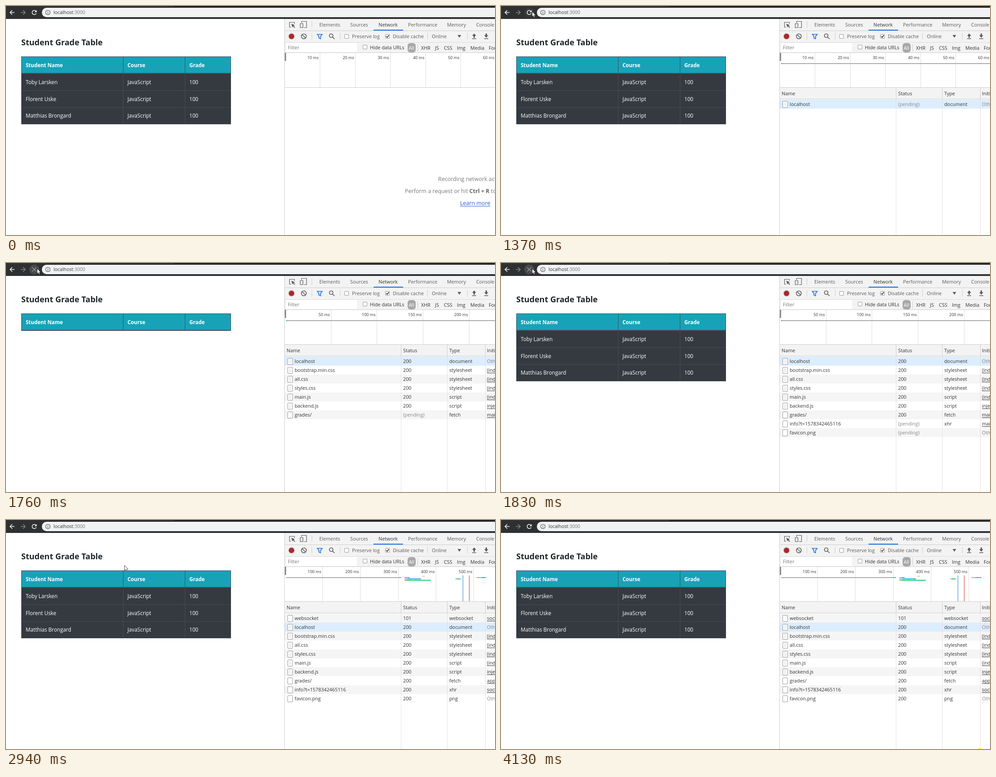
Write an HTML page with a canvas that moves like this. It is 1091 px wide and 513 px high and loops after 4200 ms.

```html
<!DOCTYPE html>
<html lang="en">
<head>
<meta charset="utf-8">
<title>Student Grade Table</title>
<style>
  html, body { margin: 0; width: 100%; height: 100%; overflow: hidden; background: #fff; }
  canvas { display: block; }
</style>
</head>
<body>
<canvas id="stage" width="1091" height="513"></canvas>
<script>
const ctx = document.getElementById('stage').getContext('2d');
const LOOP = 4200, W = 1091, H = 513, PANEL = 622;

function rect(x, y, w, h, color) {
  ctx.fillStyle = color;
  ctx.fillRect(x, y, w, h);
}
function pill(x, y, w, h, r, color) {
  ctx.fillStyle = color;
  ctx.beginPath();
  ctx.roundRect(x, y, w, h, r);
  ctx.fill();
}
function disc(x, y, r, color) {
  ctx.fillStyle = color;
  ctx.beginPath();
  ctx.arc(x, y, r, 0, 7);
  ctx.fill();
}
function stroke(d, color, width = 1) {
  ctx.strokeStyle = color;
  ctx.lineWidth = width;
  ctx.stroke(new Path2D(d));
}
function fill(d, color) {
  ctx.fillStyle = color;
  ctx.fill(new Path2D(d));
}
// Draws text on its baseline and returns the x where it ends.
function text(str, x, y, { size = 10.8, color = '#333', weight = 400, align = 'left', underline } = {}) {
  ctx.font = `${weight} ${size}px "Open Sans", "Noto Sans", sans-serif`;
  ctx.textAlign = align;
  ctx.fillStyle = color;
  ctx.fillText(str, x, y);
  const width = ctx.measureText(str).width;
  if (underline) ctx.fillRect(x, y + 2, width, 1);
  return x + width;
}

const lerp = (a, b, k) => a + (b - a) * k;
const easeOut = p => 1 - (1 - p) ** 2;
const steps = (t, start, length) => Math.floor((t - start) / length);

function cursorAt(t) {
  if (t < 120 || t >= 3170) return null;
  if (t < 680) {
    const k = easeOut(Math.min(1, steps(t, 120, 78) / 6));
    return [lerp(960, 129, k), lerp(496, 67, k)];
  }
  if (t < 2940) {
    const k = easeOut(Math.min(1, (steps(t, 680, 76.6) + 1) / 4));
    return [lerp(129, 69, k), lerp(67, 12, k)];
  }
  const k = ((steps(t, 2940, 76.6) + 1) / 3) ** 1.5;
  return [lerp(69, 1083, k), lerp(12, 476, k)];
}

function drawBrowserBar(t) {
  rect(0, 0, W, 29, '#2f3032');
  rect(375, 0, W - 375, 1, '#0c0c0d');
  stroke('M19 14.5H9M14 9.5L9 14.5L14 19.5', '#f2f2f2', 1.6);
  stroke('M33 14.5H43M38 9.5L43 14.5L38 19.5', '#858585', 1.6);

  if (t >= 910 && t < 2940) {
    const bright = t >= 1590 && t < 2140;
    disc(63, 14.5, 11, `rgba(255,255,255,${bright ? .13 : .04})`);
  }
  if (t >= 1760 && t < 2940) {
    stroke('M58.5 10L67.5 19M67.5 10L58.5 19', '#9a9a9a', 1.3);
  } else {
    stroke('M67.4 16.2A4.7 4.7 0 1 1 66.4 11.2', '#f2f2f2', 1.6);
    fill('M68.5 9V14H63.5Z', '#f2f2f2');
  }
  pill(80, 4, W, 21, 10.5, '#f1f2f3');
  stroke('M98.5 14.5A5 5 0 1 1 88.5 14.5A5 5 0 1 1 98.5 14.5M93.5 13.5V17.5M93.5 11.3V12.5', '#55585c', 1.2);
  const end = text('localhost', 106, 18, { size: 10.5, color: '#333' });
  text(':3000', end, 18, { size: 10.5, color: '#777' });
}

const students = ['Toby Larsken', 'Florent Uske', 'Matthias Brongard'];

function drawPage(loaded) {
  text('Student Grade Table', 34, 88, { size: 18, weight: 700, color: '#212529' });
  const border = '#454d55', columns = [44, 271, 409];
  const bottom = loaded ? 265 : 152;
  rect(34, 113, 468, bottom - 113, '#343a40');
  rect(34, 113, 468, 38, '#17a2b8');
  ['Student Name', 'Course', 'Grade'].forEach((label, i) =>
    text(label, columns[i], 136.5, { size: 11.5, weight: 700, color: '#fff' }));
  if (loaded) students.forEach((name, row) => {
    const y = 175 + row * 37.7;
    [name, 'JavaScript', '100'].forEach((cell, i) =>
      text(cell, columns[i], y, { size: 11.7, color: '#fff' }));
    if (row) rect(34, 151 + row * 38, 468, 1, border);
  });
  rect(34, 150, 468, 2, border);
  for (const x of [34, 261, 399, 501]) rect(x, 113, 1, bottom - 113, border);
  rect(34, 113, 468, 1, border);
  rect(34, bottom - 1, 468, 1, border);
}

function checkbox(x, y, checked) {
  pill(x, y, 10, 10, 2, '#999');
  pill(x + 1, y + 1, 8, 8, 1, '#fff');
  if (checked) stroke(`M${x + 2} ${y + 5}l2.3 2.3l4 -5`, '#333', 1.7);
}

function drawToolbars() {
  const dark = '#5a5a5a', divider = (x, y) => rect(x, y, 1, 15, '#ccc');
  rect(PANEL, 29, W, 76, '#f3f3f3');
  rect(PANEL, 55, W, 1, '#ccc');
  rect(PANEL, 81, W, 1, '#ddd');

  stroke('M643.5 40V36.5H632.5V47.5H636', dark, 1.2);
  fill('M636.5 39.5L644.5 43.2L641.6 44.3L645 47.7L643.6 49L640.3 45.6L639 48Z', dark);
  stroke('M659.5 38V34.5H670.5V48.5H665M656.5 39.5H662.5V48.5H656.5Z', dark, 1.2);
  divider(682, 34);
  [['Elements', 699], ['Sources', 768], ['Network', 831], ['Performance', 897], ['Memory', 984], ['Console', 1049]]
    .forEach(([label, x]) => text(label, x, 46, { color: label === 'Network' ? '#333' : '#5a5a5a' }));
  rect(820, 53, 66, 2, '#1a73e8');

  disc(637, 68, 7.5, '#e6c5c5');
  disc(637, 68, 6, '#a52a2f');
  stroke('M670 68A5.5 5.5 0 1 1 659 68A5.5 5.5 0 1 1 670 68M660.6 64.2L668.4 71.8', dark, 1.6);
  divider(682, 60);
  stroke('M694.5 63.5H705.5L701.8 68V73.5L698.2 72V68Z', '#1a73e8', 1.7);
  stroke('M729.5 66.5A4 4 0 1 1 721.5 66.5A4 4 0 1 1 729.5 66.5M728.5 69.5L733 74', dark, 1.7);
  divider(745, 60);
  checkbox(755, 63);
  text('Preserve log', 772, 72, { color: dark });
  checkbox(846, 63, true);
  text('Disable cache', 863, 72, { color: dark });
  divider(940, 60);
  text('Online', 950, 72, { color: dark });
  fill('M1007.5 65H1015.5L1011.5 71Z', dark);
  divider(1029, 60);
  fill('M1044.5 61.5L1049 67H1046V71H1043V67H1040ZM1040 72.5H1049V74H1040Z', dark);
  fill('M1071.5 71L1067 65.5H1070V61.5H1073V65.5H1076ZM1067 72.5H1076V74H1067Z', dark);

  rect(625, 83, 158, 20, '#fff');
  text('Filter', 629, 97, { color: '#777' });
  checkbox(796, 87);
  text('Hide data URLs', 812, 97);
  pill(896, 83, 18, 21, 6, '#a8a8a8');
  text('All', 898.5, 98, { color: '#fff' });
  divider(918, 86);
  [['XHR', 926], ['JS', 957], ['CSS', 977], ['Img', 1006], ['Media', 1036], ['Font', 1077]]
    .forEach(([label, x]) => text(label, x, 98));
}

// start ms, end ms, y, colour
const GREY = '#aaa', GREEN = '#1ec878', BLUE = '#1aa7e0';
const bars = [
  [3, 303, 128, GREY], [303, 308, 128, GREEN],
  [317, 323, 128, GREY], [323, 331, 128, GREEN],
  [317, 325, 131, GREY], [325, 361, 131, BLUE],
  [317, 322, 134, GREY], [322, 387, 134, GREEN],
  [364, 371, 125, '#ccc'], [452, 456, 131, GREY], [456, 466, 131, GREEN],
  [508, 521, 128, GREY], [521, 528, 128, BLUE], [528, 534, 128, GREEN],
];

function drawTimeline(t) {
  const [unit, gap] = t < 1760 ? [10, 78.4] : t < 1910 ? [50, 102.7] : t < 2140 ? [100, 100] : [100, 84.2];
  rect(PANEL, 104, W, 1, '#ccc');
  rect(PANEL, 182, W, 1, '#ccc');
  for (let i = 1; i < 7; i++) {
    const x = Math.round(PANEL + i * gap);
    rect(x, 105, 1, 77, '#ddd');
    text(`${unit * i} ms`, x - 2.5, 119, { size: 9, align: 'right' });
  }
  rect(PANEL, 105, 3, 18, '#8a8a8a');
  if (t < 1290) return;
  if (t < 1910) {
    rect(625, 128, W, 2, GREY);
    rect(625, 128, 2, 2, '#3a9c8c');
    return;
  }
  const px = ms => PANEL + ms * gap / unit;
  for (const [start, end, y, color] of bars) rect(px(start), y, px(end) - px(start), 2, color);
  rect(Math.round(px(471)), 124, 1, 58, '#2f7fc8');
  rect(Math.round(px(488)), 124, 1, 58, '#c8322f');
}

function requestsAt(t) {
  const asset = (name, type, from = '(index)') => [name, '200', type, from, true];
  const rows = [
    asset('localhost', 'document', 'Other'),
    asset('bootstrap.min.css', 'stylesheet'),
    asset('all.css', 'stylesheet'),
    asset('styles.css', 'stylesheet'),
    asset('main.js', 'script'),
    asset('backend.js', 'script', 'injected'),
  ];
  if (t < 1370) return [];
  if (t < 1590) return [['localhost', '(pending)', 'document', 'Other', true]];
  if (t < 1680) return rows.slice(0, 5);
  if (t < 1760) return rows;
  const done = t >= 1910;
  rows.push(['grades/', t < 1830 ? '(pending)' : '200', 'fetch', done ? 'app.jsx' : 'main.js']);
  if (t < 1830) return rows;
  const status = done ? '200' : '(pending)';
  rows.push(['info?t=1578342465116', status, 'xhr', done ? 'sockjs.js' : 'main.js'],
            ['favicon.png', status, done ? 'png' : '', 'Other']);
  if (done) rows.unshift(['websocket', t < 2140 ? '(pending)' : '101', 'websocket', 'sockjs.js']);
  return rows;
}

function drawRequests(t) {
  rect(PANEL, 183, W, 25, '#f3f3f3');
  rect(PANEL, 208, W, 1, '#ccc');
  [['Name', 626], ['Status', 886], ['Type', 989], ['Initiator', 1073]]
    .forEach(([label, x]) => text(label, x, 199.5));
  requestsAt(t).forEach(([name, status, type, initiator, lined], i) => {
    const y = 210 + i * 20, base = y + 14;
    if (name === 'localhost') rect(PANEL, y, W, 20, '#dcedfd');
    else if (i % 2 === 0) rect(PANEL, y, W, 20, '#f5f5f5');
    pill(628, y + 3, 12, 15, 1.5, '#999');
    rect(629, y + 4, 10, 13, '#fff');
    if (lined) for (let k = 0; k < 4; k++) rect(631, y + 6 + k * 2.5, 6, 1, '#ddd');
    text(name, 644, base);
    text(status, 886, base, { color: status === '(pending)' ? '#888' : '#333' });
    text(type, 989, base);
    const plain = initiator === 'Other';
    text(initiator, 1073, base, { color: plain ? '#888' : '#333', underline: !plain });
  });
  for (const x of [881, 984, 1069]) {
    rect(x, 183, 1, 26, '#ccc');
    rect(x, 209, 1, H, '#e1e1e1');
  }
}

function drawHint() {
  const style = { size: 12.5, color: '#777' };
  text('Recording network activity…', 964, 392, style);
  let x = text('Perform a request or hit ', 890, 419, style);
  x = text('Ctrl + R', x, 419, { ...style, weight: 700, color: '#666' });
  text(' to record the reload.', x, 419, style);
  text('Learn more', 1013, 446, { size: 12.5, color: '#1f5fbf', underline: true });
}

function drawPointer(t) {
  if (t >= 1140 && t < 1290) disc(69, 12, 9, 'rgba(255,240,0,.7)');
  if (t >= 4130) disc(1068, 520, 9, '#ffee2e');
  const at = cursorAt(t);
  if (!at) return;
  ctx.save();
  ctx.translate(...at.map(Math.round));
  const arrow = 'M.5 .5V12L3 9.6L4.7 13.6L6.6 12.8L5 9H8.4Z';
  fill(arrow, '#fff');
  stroke(arrow, '#222', .8);
  ctx.restore();
}

function frame(now) {
  const t = now % LOOP;
  rect(0, 0, W, H, '#fff');
  drawPage(t < 1760 || t >= 1830);
  drawToolbars();
  drawTimeline(t);
  if (t < 1290) drawHint();
  else drawRequests(t);
  rect(PANEL - 1, 29, 1, H, '#ccc');
  drawBrowserBar(t);
  drawPointer(t);
  requestAnimationFrame(frame);
}
requestAnimationFrame(frame);
</script>
</body>
</html>
```
